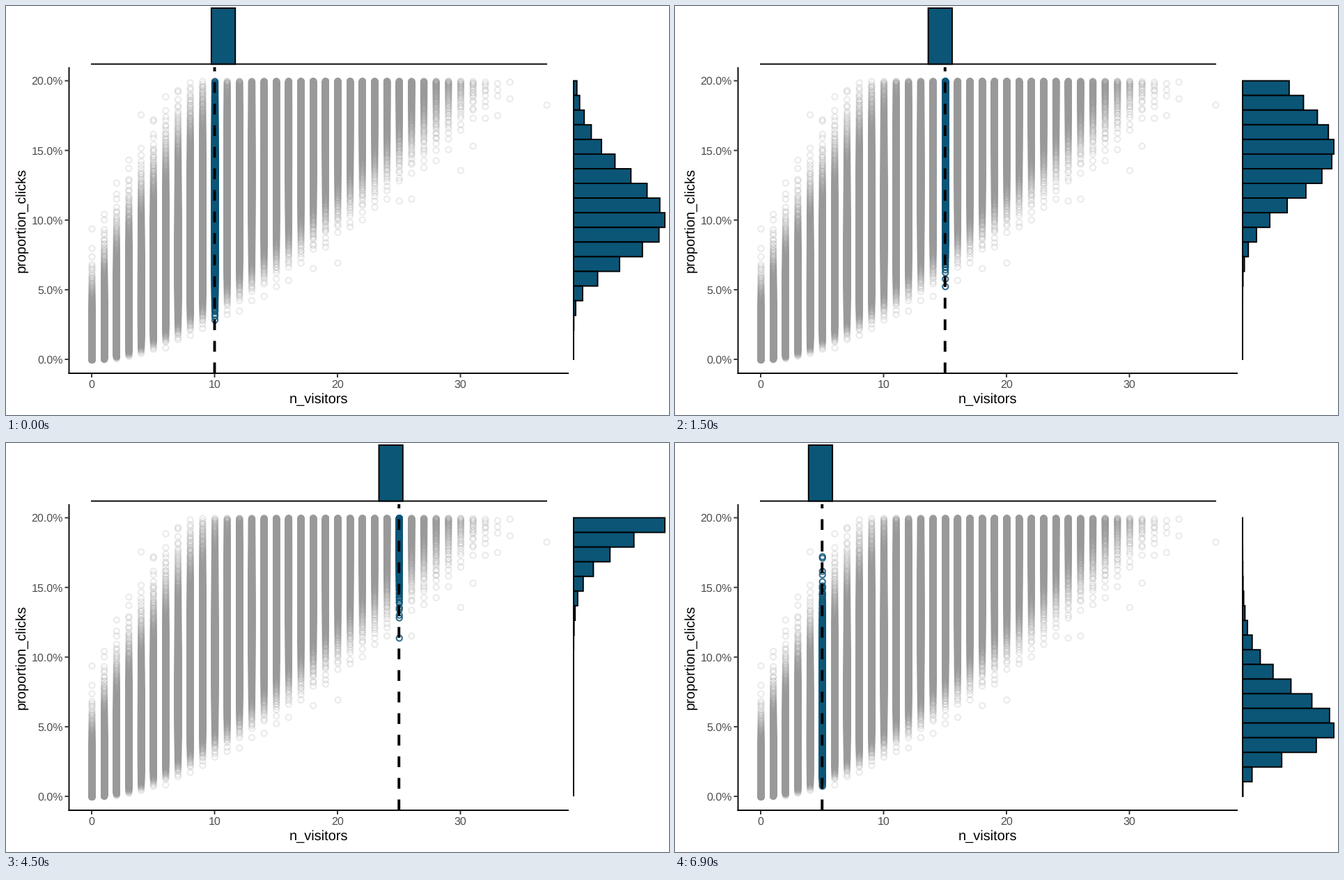
A matplotlib script that plays this animation: 952x588 px, repeating every 7.5 s.

```python
from math import comb

import numpy as np
import matplotlib.pyplot as plt
from matplotlib.animation import FuncAnimation
from matplotlib.markers import MarkerStyle
from matplotlib.patches import Rectangle
from matplotlib.transforms import Affine2D

W, H, DPI = 952, 588, 64
PT = 72 / DPI                      # points per pixel
BLUE, GREY = "#0b5577", "#999999"
LEFT, RIGHT, TOP, BOTTOM = 90.5, 808, 88, 528
BINS, RING, DASH = 19, 8.2, 15.5
SAMPLES, TRIALS = 100_000, 100
PICKS = (10, 15, 20, 25, 5)        # visitors selected, in turn
RATES = np.linspace(0, 0.2, 19_001)

plt.rcParams.update({"font.family": "Liberation Sans", "text.hinting": "none"})
rng = np.random.default_rng(7)
fig = plt.figure(figsize=(W / DPI, H / DPI), dpi=DPI, facecolor="white")
ax = fig.add_axes([0, 0, 1, 1])
ax.set(xlim=(0, W), ylim=(H, 0))
ax.axis("off")


def px(visitors):
    return 123 + 17.65 * visitors


def py(percent):
    return 508 - 20.025 * percent


def likelihood(k):
    return comb(TRIALS, k) * RATES**k * (1 - RATES)**(TRIALS - k)


def click_rates(k):
    """Stratified draw of the click rates (in %) that gave k visitors."""
    like = likelihood(k)
    n = round(SAMPLES * like.mean())
    cdf = np.cumsum(like) / like.sum()
    return np.interp((np.arange(n) + rng.random(n)) / n, cdf, 100 * RATES)


def bar_lengths(k):
    """Side histogram from the highest rate down, scaled to the panel."""
    counts, _ = np.histogram(RATES, BINS, weights=likelihood(k))
    return 131 * counts[::-1] / counts.max()


def line(x, y, color="black", width=1.9, **kw):
    return ax.plot(x, y, color=color, lw=width * PT, snap=False,
                   solid_capstyle="butt", **kw)[0]


def label(x, y, text, size, color="black", **kw):
    ax.text(x, y, text, fontsize=size * PT, color=color, va="baseline", **kw)


def rings(k, rates, color, alpha, z):
    # markers land on whole pixels, so the remainder goes into the marker
    whole = round(px(k))
    shift = Affine2D().translate((px(k) - whole) / RING, 0)
    return ax.plot(np.full(len(rates), whole), py(rates), ls="none",
                   marker=MarkerStyle("o", transform=shift), ms=RING * PT,
                   mew=2.1 * PT, mfc="none", mec=color, alpha=alpha,
                   zorder=z)[0]


def bar(x, y, w, h):
    return ax.add_patch(Rectangle((x, y), w, h, fc=BLUE, ec="black",
                                  lw=1.9 * PT, joinstyle="miter",
                                  snap=False, zorder=2))


# scatter
columns = {k: click_rates(k) for k in range(35)}
columns[37] = np.array([18.27])
for k, rates in columns.items():
    rings(k, rates, GREY, 0.2, 1)
picked = {k: rings(k, columns[k], BLUE, 0.8, 3) for k in PICKS}

# axes
line([LEFT, LEFT], [TOP, BOTTOM + 1])
line([LEFT - 1, RIGHT], [BOTTOM, BOTTOM])
for v in range(0, 40, 10):
    line([px(v)] * 2, [BOTTOM + 1, BOTTOM + 6], "#333333")
    label(px(v), 548.7, str(v), 16, "#4d4d4d", ha="center")
for p in range(0, 25, 5):
    line([LEFT - 6, LEFT - 1], [py(p)] * 2, "#333333")
    label(81.8, py(p) + 5.8, f"{p:.1f}%", 16, "#4d4d4d", ha="right")
label(449.2, 571.5, "n_visitors", 20, ha="center")
label(27.5, 307.5, "proportion_clicks", 20, ha="center",
      rotation=90, rotation_mode="anchor")

# marker line and marginal histograms
marker = line([], [], width=3.9, zorder=4, dashes=(DASH / 3.9, DASH / 3.9),
              dash_capstyle="butt")
line([px(0) - 1, px(37) + 1], [83.5, 83.5])
step_x = (px(37) - px(0)) / BINS
step_y = (py(0) - py(20)) / BINS
top_bar = bar(px(0), 3, step_x, 80.5)
side_bars = [bar(815, py(20) + i * step_y, 0, step_y) for i in range(BINS)]


def update(i):
    k = PICKS[i]
    for key, column in picked.items():
        column.set_visible(key == k)
    marker.set_data([px(k)] * 2, [BOTTOM, TOP])
    top_bar.set_x(px(0) + step_x * ((px(k) - px(0)) // step_x))
    for b, length in zip(side_bars, bar_lengths(k)):
        b.set_width(length)
    return [*picked.values(), marker, top_bar, *side_bars]


anim = FuncAnimation(fig, update, frames=len(PICKS), interval=1500,
                     repeat=True, repeat_delay=0)
plt.show()
```
